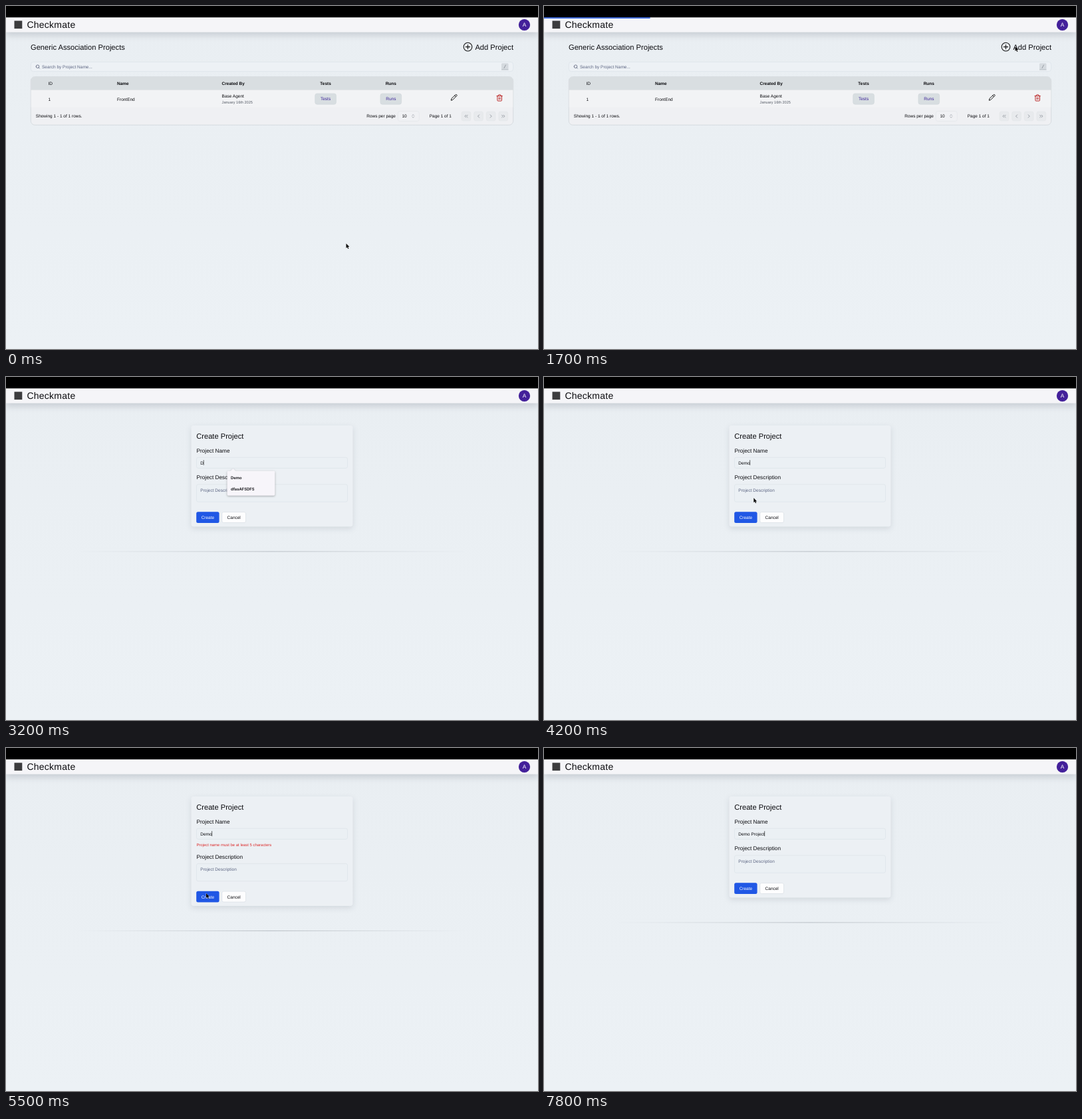
An HTML page for the animation above (8000 ms loop, 800 px wide and 517 px high).

```html
<!DOCTYPE html>
<html lang="en">
<head>
<meta charset="utf-8">
<title>Create a project</title>
<style>
  html, body { margin: 0; width: 100%; height: 100%; overflow: hidden; background: #ebf0f4; }
  svg { display: block; width: 800px; height: 517px; }
  text { font: 6.5px "Liberation Sans", Arial, sans-serif; fill: #0b0b0f; text-rendering: geometricPrecision; white-space: pre; }
  .title { font-size: 11.15px; }
  .label { font-size: 8.3px; }
  .brand { font-size: 14px; letter-spacing: .25px; }
  .small { font-size: 5.6px; fill: #555b66; }
  .bold { font-weight: 700; }
  .hint { fill: #5c6582; }
  .link { fill: #3b2398; }
  .white { fill: #fff; }
  .error { font-size: 5.95px; fill: #dc2b2b; }
  .option { font: 600 5.9px Inter, sans-serif; }
  .mid { text-anchor: middle; }
  .line { fill: none; stroke: #111; stroke-linecap: round; stroke-linejoin: round; }
  .header { filter: drop-shadow(0 5px 5px rgba(20, 30, 45, .15)); }
  .card { filter: drop-shadow(0 3px 4px rgba(20, 30, 45, .11)); }
  .popup { filter: drop-shadow(0 1px 1.5px rgba(0, 0, 0, .3)); }
</style>
</head>
<body>
<svg id="stage" viewBox="0 0 800 517">
  <defs>
    <linearGradient id="sky" x2="0" y2="1">
      <stop stop-color="#e9eef2"/><stop offset="1" stop-color="#ecf1f5"/>
    </linearGradient>
    <linearGradient id="fade">
      <stop stop-color="#c3c9cf" stop-opacity="0"/>
      <stop offset=".5" stop-color="#bcc2c8"/>
      <stop offset="1" stop-color="#c3c9cf" stop-opacity="0"/>
    </linearGradient>
  </defs>
</svg>
<script>
const NS = "http://www.w3.org/2000/svg";
const stage = document.getElementById("stage");

function add(parent, tag, attrs, content) {
  const el = document.createElementNS(NS, tag);
  for (const key in attrs) el.setAttribute(key, attrs[key]);
  if (content) el.textContent = content;
  return parent.appendChild(el);
}
const group = (parent, attrs) => add(parent, "g", attrs);
const text = (parent, x, y, content, cls = "") => add(parent, "text", { x, y, class: cls }, content);
const box = (parent, x, y, width, height, fill, rx = 0, stroke = "none") =>
  add(parent, "rect", { x, y, width, height, fill, rx, stroke, "stroke-width": .7 });
// Icon paths use a 24-unit grid.
const icon = (parent, x, y, size, d, stroke = "#111", width = 2) =>
  add(parent, "path", { d, class: "line", transform: `translate(${x} ${y}) scale(${size / 24})`,
    style: `stroke:${stroke};stroke-width:${width}` });
const show = (el, on) => el.setAttribute("visibility", on ? "inherit" : "hidden");

box(stage, 0, 0, 800, 517, "url(#sky)");

// Project list
const list = group(stage);
text(list, 37, 65.6, "Generic Association Projects", "title");
text(list, 705.4, 65.6, "Add Project", "title");
icon(list, 686.9, 54, 15.2, "M2 12a10 10 0 1 0 20 0a10 10 0 1 0-20 0M7 12h10M12 7v10", "#111", 1.7);

box(list, 37.3, 84.3, 725.4, 14.4, "#edf1f5", 4, "#dce2e8");
icon(list, 44.3, 88, 7, "M3 11a8 8 0 1 0 16 0a8 8 0 1 0-16 0M21 21l-4.3-4.3", "#39415f", 2.2);
text(list, 54, 93.6, "Search by Project Name...", "hint");
box(list, 745, 86.3, 10.5, 9.8, "#d5dadf", 1.5);
box(list, 745, 95.6, 10.5, .8, "#a9afb6");
add(list, "path", { d: "M749 93.6l2.4-4.6", class: "line", style: "stroke:#69707a;stroke-width:.6" });

box(list, 37.3, 106.6, 725.4, 72.8, "#eff0f3", 6, "#cdd3d9");
add(list, "path", { d: "M37.7 126.8V112.6q0-5.7 5.7-5.7H756.6q5.7 0 5.7 5.7V126.8z", fill: "#d9dee1" });
box(list, 37.7, 126.8, 724.6, 26, "#f2f3f5");

text(list, 63.4, 119.3, "ID");
text(list, 167, 119.3, "Name", "bold");
text(list, 324.6, 119.3, "Created By", "bold");
text(list, 480.6, 119.3, "Tests", "bold mid");
text(list, 578.8, 119.3, "Runs", "bold mid");
text(list, 63.4, 142.5, "1");
text(list, 167, 142.5, "FrontEnd");
text(list, 324.6, 137.8, "Base Agent");
text(list, 324.6, 147.2, "January 16th 2025", "small");
for (const [x, name] of [[480.6, "Tests"], [578.8, "Runs"]]) {
  box(list, x - 15.8, 132, 31.6, 16.2, "#d8dee1", 3, "#d1d7dc");
  text(list, x, 142.3, name, "link mid");
}
icon(list, 668.4, 132.5, 10.6, "M17 3a2.83 2.83 0 1 1 4 4L7.5 20.5 2 22l1.5-5.5zM14.500 5.500l4 4", "#111", 2.2);
icon(list, 736.6, 132.8, 11.2,
  "M3 6h18M19 6v14a2 2 0 0 1-2 2H7a2 2 0 0 1-2-2V6M8 6V4a2 2 0 0 1 2-2h4a2 2 0 0 1 2 2v2M10 11v6M14 11v6", "#b91c1c", 2);

text(list, 44.8, 168.3, "Showing 1 - 1 of 1 rows.");
text(list, 542.2, 168.3, "Rows per page");
box(list, 589.3, 158.6, 32, 15, "#f0f1f4", 3, "#e3e6ea");
text(list, 595.4, 168.3, "10");
icon(list, 608.7, 162.5, 7, "M7 15l5 5 5-5M7 9l5-5 5 5", "#777d86", 2);
text(list, 636.7, 168.3, "Page 1 of 1");
const arrows = ["M11 17l-5-5 5-5M18 17l-5-5 5-5", "M15 18l-6-6 6-6", "M9 18l6-6-6-6", "M6 17l5-5-5-5M13 17l5-5-5-5"];
arrows.forEach((d, i) => {
  const x = 685.2 + i * 18.6;
  box(list, x, 159.2, 13.6, 13.8, "#e8eaed", 2.5, "#e2e5e8");
  icon(list, x + 2.5, 161.8, 8.6, d, "#7d838b", 2);
});

// Project form
const form = group(stage);
const card = box(form, 278.5, 73, 243, 152.5, "#ecf0f4", 4);
card.setAttribute("class", "card");
text(form, 286.2, 93.2, "Create Project", "title");
text(form, 286.4, 113.6, "Project Name", "label");
box(form, 286.5, 121.2, 227, 16.2, "#ebf0f4", 2.5, "#dce2e9");
const nameText = text(form, 292.3, 131.5, "");
const caret = box(form, 0, 125.2, .65, 7.8, "#111");
const error = text(form, 286.4, 147.7, "Project name must be at least 5 characters", "error");

const lower = group(form);
text(lower, 286.4, 154.4, "Project Description", "label");
box(lower, 286.5, 161.8, 227, 26.4, "#ebf0f4", 2.5, "#dce2e9");
text(lower, 292.3, 172.8, "Project Description", "hint");
box(lower, 286.2, 203.3, 34.4, 16.6, "#2057e5", 2.5);
text(lower, 303.4, 214, "Create", "white mid");
box(lower, 324.8, 203.6, 35.8, 16, "#fdfdfe", 2.5, "#d9dee4");
text(lower, 342.7, 214, "Cancel", "mid");
box(lower, 105, 262.5, 590, 1.1, "url(#fade)");

const popup = group(form, { class: "popup" });
add(popup, "path", { d: "M337.500 142l4-4 4 4z", fill: "#f7f5fa" });
const popupBox = box(popup, 332.6, 141.4, 71.8, 37.4, "#f7f5fa", 2);
text(popup, 338, 154.3, "Demo", "option");
const secondOption = text(popup, 338, 170.9, "dfasAFSDFS", "option");

// Header
box(stage, 0, 17, 800, 22.5, "#f5f5f8").setAttribute("class", "header");
box(stage, 0, 0, 800, 17.2, "#000");
box(stage, 12.5, 22.3, 11.8, 11.8, "#3c3c3e");
text(stage, 31.4, 33.2, "Checkmate", "brand");
add(stage, "circle", { cx: 779.5, cy: 28.4, r: 8.6, fill: "#43209a" });
text(stage, 779.5, 31.4, "A", "label white mid");
const bar = box(stage, 0, 17.2, 800, 1.6, "#2459dc");

const pointer = group(stage);
const ring = add(pointer, "circle", { r: 10, class: "line", style: "stroke-width:.9" });
add(pointer, "path", { d: "M0 0V6.900l1.600-1.400 1.100 2.400 1.200-.5-1.100-2.300h2.100z",
  fill: "#0a0a0a", stroke: "#fff", "stroke-width": .5, "paint-order": "stroke" });

const LOOP = 8000, STEP = 100;
const path = [
  [0, 511.5, 358], [100, 557, 259], [300, 557, 259], [400, 650, 135], [500, 708.5, 61], [1700, 708.5, 61],
  [2100, 398, 103], [2300, 341, 128], [4000, 341, 128], [4300, 302.5, 209.5],
  [4900, 302.5, 209.5], [5300, 301, 219], [8000, 301, 219]
];
const typing = [
  [0, ""], [3000, "D"], [3400, "De"], [3500, "Dem"], [3700, "Demo"], [5800, "Demo "], [6400, "Demo P"],
  [6600, "Demo Pr"], [6700, "Demo Pro"], [7200, "Demo Proj"], [7400, "Demo Proje"],
  [7500, "Demo Projec"], [7700, "Demo Project"]
];
const clicks = [[1200, 1600], [2300, 2500], [4400, 4600]];

const within = (t, from, to) => t >= from && t < to;
function position(t) {
  const i = path.findIndex(p => p[0] > t);
  const [t0, x0, y0] = path[i - 1], [t1, x1, y1] = path[i];
  const k = (t - t0) / (t1 - t0);
  return [x0 + (x1 - x0) * k, y0 + (y1 - y0) * k];
}

function draw(t) {
  const formOpen = t >= 2000;
  show(list, !formOpen);
  show(form, formOpen);

  show(bar, within(t, 1700, 2300));
  bar.setAttribute("width", Math.min(800, 798 * (t - 1600) / 500));

  const value = typing.filter(s => s[0] <= t).pop()[1];
  nameText.textContent = value || "Project Name";
  nameText.setAttribute("class", value ? "" : "hint");
  show(caret, t >= 2500);
  if (formOpen) caret.setAttribute("x", 292.1 + (value ? nameText.getComputedTextLength() : 0));

  show(popup, within(t, 3000, 3700) && formOpen);
  show(secondOption, within(t, 3000, 3400));
  popupBox.setAttribute("height", t < 3400 ? 37.4 : 21.4);

  const invalid = within(t, 4500, 6100);
  show(error, invalid);
  lower.setAttribute("transform", `translate(0 ${invalid ? 12.5 : 0})`);
  card.setAttribute("height", invalid ? 165 : 152.5);

  show(pointer, t < 3000 || within(t, 4000, 5800));
  pointer.setAttribute("transform", `translate(${position(t)})`);
  show(ring, clicks.some(c => within(t, ...c)));
}

const start = performance.now();
function tick() {
  const t = (performance.now() - start) % LOOP;
  draw(Math.floor(t / STEP) * STEP);
  requestAnimationFrame(tick);
}
tick();
</script>
</body>
</html>
```
